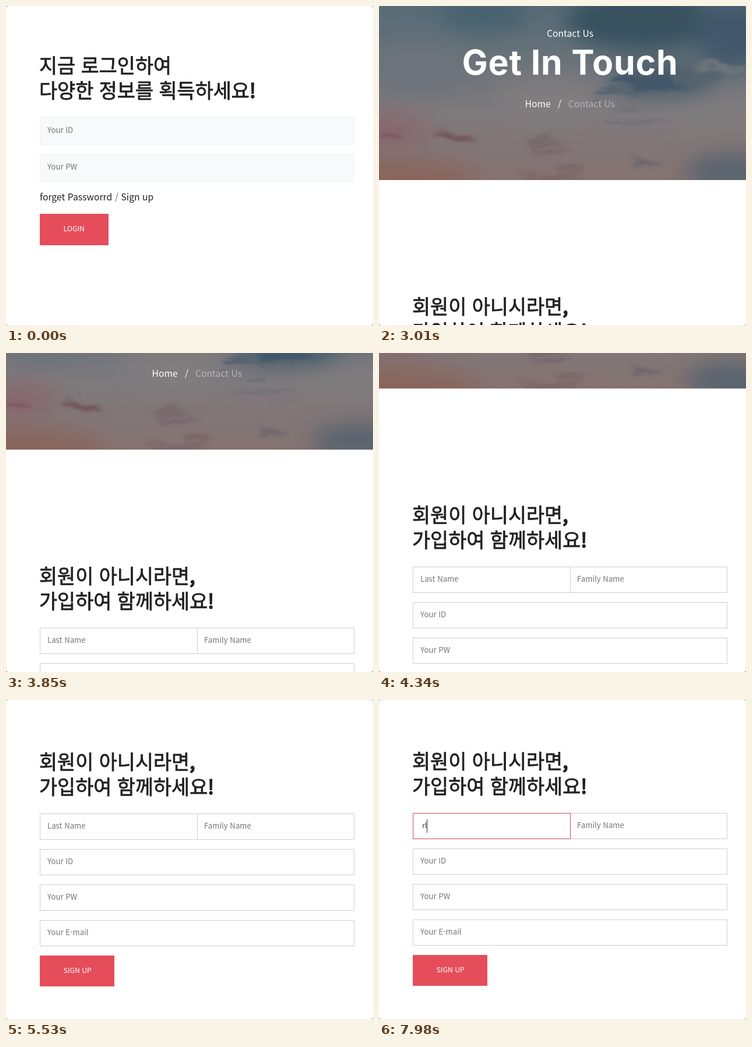
These frames come from a looping animation (630x548 px, 8000 ms). An HTML page:

```html
<!DOCTYPE html>
<html lang="ko">
<head>
<meta charset="utf-8">
<style>
html, body { margin: 0; width: 100%; height: 100%; overflow: hidden; background: #444; }
#stage { display: block; border-radius: 3px; background: #fff; }
text { font: 15.7px "Noto Sans CJK KR", "Noto Sans CJK JP", "Noto Sans", sans-serif; fill: #212121; white-space: pre; }
.head { font-size: 33.8px; fill: #212121; stroke: #212121; stroke-width: .8px; }
.head tspan { stroke-width: 1.8px; }
.hint { font-size: 13.2px; fill: #757575; }
.button { font-size: 12.3px; fill: #fff; }
.light { fill: #fff; }
.title { font: 700 59px Inter, "Open Sans", sans-serif; letter-spacing: .8px; fill: #fff; }
.mid { text-anchor: middle; }
.soft { fill: #f8f9fb; stroke: #f0f1f3; }
.line { fill: #fff; stroke: #cfcfcf; }
.red { fill: #e64d5b; }
filter { color-interpolation-filters: sRGB; }
</style>
</head>
<body>
<svg id="stage" width="630" height="548" viewBox="0 0 630 548">
  <defs>
    <linearGradient id="sky" x2="0" y2="1">
      <stop offset="0" stop-color="#566b77"/>
      <stop offset=".35" stop-color="#6c747b"/>
      <stop offset=".62" stop-color="#7f7a7d"/>
      <stop offset="1" stop-color="#857371"/>
    </linearGradient>
    <filter id="wide" x="-20%" y="-20%" width="140%" height="140%"><feGaussianBlur stdDeviation="18"/></filter>
    <filter id="fine" x="-20%" y="-20%" width="140%" height="140%">
      <feGaussianBlur in="SourceGraphic" stdDeviation="5" result="soft"/>
      <feTurbulence type="fractalNoise" baseFrequency=".016 .035" numOctaves="4" seed="4"/>
      <feDisplacementMap in="soft" scale="50" xChannelSelector="R" yChannelSelector="G"/>
    </filter>
  </defs>

  <g id="login">
    <text class="head" x="57" y="115">지금 로그인하여</text>
    <text class="head" x="57" y="158">다양한 정보를 획득하세요<tspan>!</tspan></text>
    <rect class="soft" x="58.5" y="191.5" width="539" height="47"/>
    <rect class="soft" x="58.5" y="254.5" width="539" height="47"/>
    <text class="hint" x="71" y="218">Your ID</text>
    <text class="hint" x="71" y="281">Your PW</text>
    <text x="58" y="334">forget Passworrd</text>
    <text x="187" y="334" style="fill:#666">/</text>
    <text x="197.5" y="334" id="link">Sign up</text>
    <rect class="red" x="58" y="357" width="118" height="54"/>
    <text class="button" x="98.5" y="387">LOGIN</text>
  </g>

  <g id="join">
    <svg width="630" height="299">
      <rect width="630" height="299" fill="url(#sky)"/>
      <g id="haze" filter="url(#wide)"/>
      <g id="clouds" filter="url(#fine)"/>
    </svg>
    <text class="light mid" x="328" y="53">Contact Us</text>
    <text class="title mid" x="328" y="118">Get In Touch</text>
    <text class="light" x="250.5" y="174">Home</text>
    <text class="light" x="307" y="174">/</text>
    <text x="325" y="174" style="fill:#b5b5b8">Contact Us</text>

    <text class="head" x="57" y="529">회원이 아니시라면<tspan>,</tspan></text>
    <text class="head" x="57" y="572">가입하여 함께하세요<tspan>!</tspan></text>
    <rect class="line" x="58.5" y="605.5" width="270" height="44"/>
    <rect class="line" x="328.5" y="605.5" width="269" height="44"/>
    <rect class="line" x="58.5" y="666.5" width="539" height="44"/>
    <rect class="line" x="58.5" y="727.5" width="539" height="44"/>
    <rect class="line" x="58.5" y="788.5" width="539" height="44"/>
    <rect id="focus" x="58.5" y="605.5" width="270" height="44" fill="none" stroke="#c4505f"/>
    <text class="hint" x="71" y="631" id="lastName">Last Name</text>
    <text class="hint" x="340" y="631">Family Name</text>
    <text class="hint" x="71" y="692">Your ID</text>
    <text class="hint" x="71" y="753">Your PW</text>
    <text class="hint" x="71" y="814">Your E-mail</text>
    <text x="74" y="631" id="typed" style="font-size:12.5px;fill:#444"></text>
    <rect id="caret" y="616" width="1" height="23" fill="#333"/>
    <rect class="red" x="58" y="849" width="128" height="53"/>
    <text class="button" x="98.5" y="879">SIGN UP</text>
  </g>
</svg>
<script>
const $ = id => document.getElementById(id);
const LOOP = 8000, STEP = 70;

// cx, cy, rx, ry, colour
const haze = [
  [180, 15, 75, 28, '#47616e'], [450, 25, 130, 50, '#38515f'], [610, 50, 70, 60, '#42586a'],
  [490, 125, 90, 32, '#4d606d'], [70, 110, 80, 40, '#6d737b'], [290, 160, 90, 40, '#817c7e'],
  [570, 185, 110, 22, '#807d7e'], [20, 215, 70, 35, '#866a6f'], [30, 300, 140, 34, '#89655b'],
  [610, 285, 85, 30, '#56636f']
];
const clouds = [
  [133, 222, 42, 11, '#74565e'], [20, 215, 28, 9, '#80595f'], [295, 243, 45, 5, '#756268'],
  [455, 265, 22, 5, '#66616a'], [475, 130, 65, 16, '#42576a'], [405, 155, 45, 9, '#566370'],
  [540, 120, 40, 8, '#54636f'], [450, 200, 60, 5, '#706f76'], [290, 292, 50, 5, '#776165'],
  [590, 105, 50, 8, '#6f767c']
];
const blobs = list => list.map(([x, y, rx, ry, c]) =>
  `<ellipse cx="${x}" cy="${y}" rx="${rx}" ry="${ry}" fill="${c}"/>`).join('');
$('haze').innerHTML = blobs(haze);
$('clouds').innerHTML = blobs(clouds);

// time, scroll offset
const scrollKeys = [
  [3570, 0], [3710, 60], [3850, 133], [3920, 152], [4130, 152], [4200, 172], [4340, 238],
  [4480, 296], [4620, 325], [4690, 325], [4830, 350], [4970, 378], [5110, 394],
  [5250, 402], [5460, 402], [5530, 410], [5600, 411]
];
const ramp = (t, a, b) => Math.min(1, Math.max(0, (t - a) / (b - a)));
const mix = (a, b, k) => a + (b - a) * k;

function scrollAt(t) {
  let y = 0;
  for (let i = 1; i < scrollKeys.length; i++) {
    const [t0, y0] = scrollKeys[i - 1], [t1, y1] = scrollKeys[i];
    y += (y1 - y0) * ramp(t, t0, t1);
  }
  return Math.round(y);
}

const show = (id, on) => $(id).style.display = on ? '' : 'none';

function draw(now) {
  const t = Math.floor(now % LOOP / STEP) * STEP;
  show('login', t < 3010);
  show('join', t >= 3010);

  const hover = ramp(t, 1400, 1750);
  $('link').style.fill = `rgb(${mix(33, 222, hover)},${mix(33, 76, hover)},${mix(33, 92, hover)})`;

  $('join').setAttribute('transform', `translate(0 ${-scrollAt(t)})`);
  $('focus').setAttribute('opacity', ramp(t, 6020, 6230));
  show('lastName', t < 6930);
  $('typed').textContent = t < 7700 ? '' : t < 7770 ? 'r' : 'rl';
  show('caret', t >= 6090 && (t < 6440 || t >= 6930));
  $('caret').setAttribute('x', t < 6930 ? 71 : t < 7700 ? 74 : t < 7770 ? 79 : 82);
  requestAnimationFrame(draw);
}
requestAnimationFrame(draw);
</script>
</body>
</html>
```
